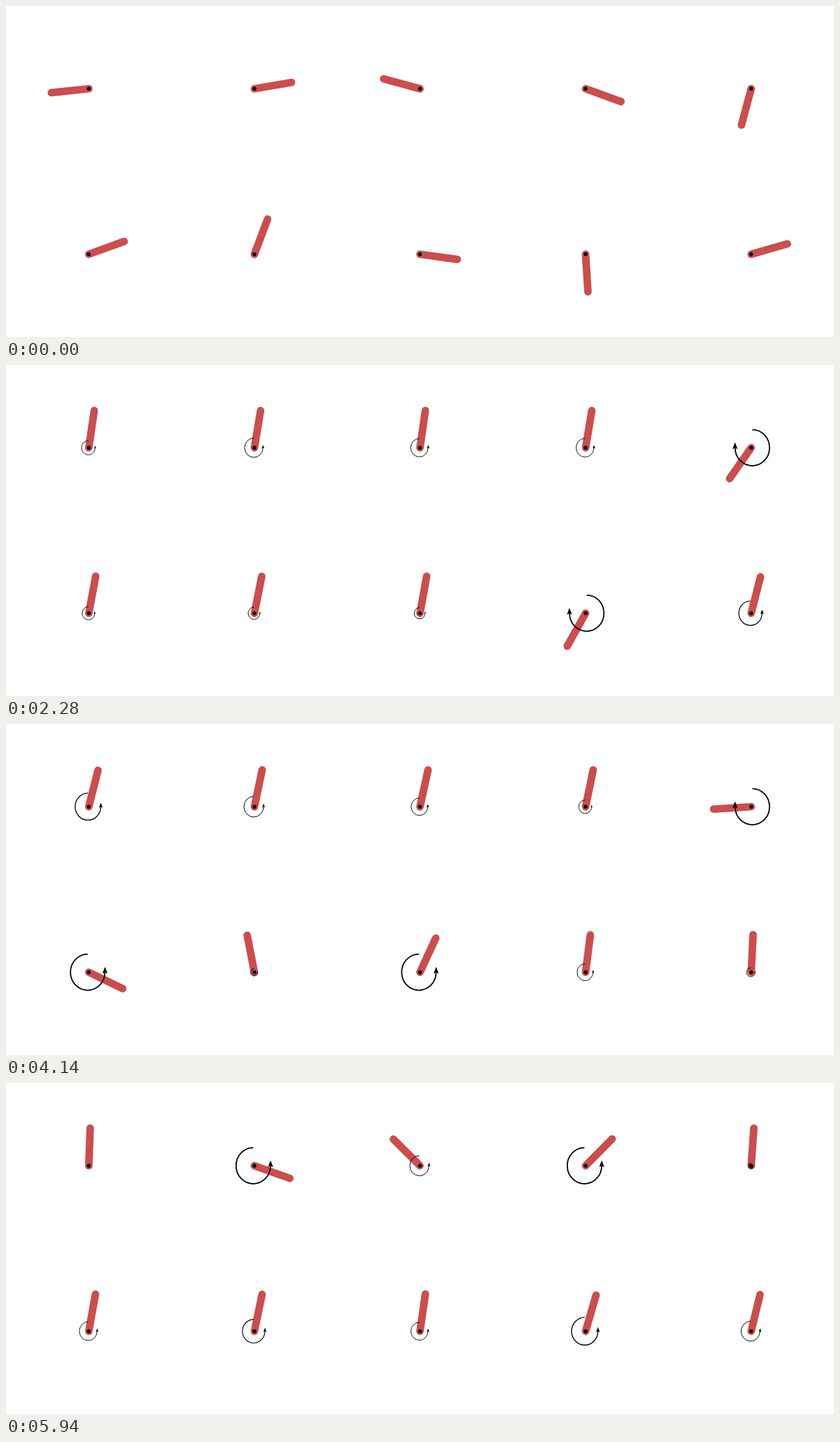
These frames come from a looping animation (1183x473 px, 5.97 s). An HTML page with a canvas:

```html
<!DOCTYPE html>
<html lang="en">
<head>
<meta charset="utf-8">
<title>Ten pendulums</title>
<style>
  html, body { margin: 0; width: 100%; height: 100%; overflow: hidden; background: #fff; }
  canvas { display: block; }
</style>
</head>
<body>
<canvas id="stage" width="1183" height="473"></canvas>
<script>
const ctx = document.getElementById('stage').getContext('2d');
const CELL = 236.6, ROD = CELL / 4.4, STEPS = 199, STEP_MS = 30, REST = 125;
const { sin, cos, abs, floor, max, min, PI } = Math;

// start: first angle, clockwise from upright.
// drops: steps at which the rod sweeps through the bottom on a full turn.
// rock: turning points before that, their reach going evenly from one value to the other.
const pendulums = [
  { start: 264, drops: [34.4, 173.2], rock: { at: [5, 27], reach: [92, 51] } },
  { start: 80.3, drops: [13, 202.7] },
  { start: 285.2, drops: [34.3, 189.5], rock: { at: [4, 27], reach: [108, 47] } },
  { start: 110, drops: [10.5, 211] },
  { start: 195, drops: [169],
    rock: { at: [17, 35, 53, 72, 88, 104, 122, 139, 160], reach: [-24, 97] } },
  { start: 70, drops: [15, 142.2] },
  { start: 20.6, drops: [21, 124.3] },
  { start: 97.8, drops: [11.5, 158] },
  { start: 176.4, drops: [103], rock: { at: [9, 26, 46, 67.5, 91], reach: [-27, 100] } },
  { start: 74, drops: [14, 111.2] }
];

// Shape of a full turn: slow tip over, sweep, slow return to balance.
const turn = [
  [-36, 14], [-22, 22], [-14, 41], [-9, 66], [-4.5, 112], [0, 180],
  [5, 266], [8.5, 315], [14, 350], [18, 359], [27, 363], [36, 367.5]
];

// Smooth curve through points without overshoot.
function curve(pts) {
  const last = pts.length - 1;
  const d = pts.slice(1).map((p, i) => (p[1] - pts[i][1]) / (p[0] - pts[i][0]));
  const m = pts.map((p, i) => {
    const a = d[max(0, i - 1)], b = d[min(last - 1, i)];
    return a * b <= 0 ? 0 : 2 * a * b / (a + b);
  });
  return x => {
    if (x <= pts[0][0]) return pts[0][1];
    if (x >= pts[last][0]) return pts[last][1];
    const i = pts.findIndex(p => p[0] > x) - 1;
    const h = pts[i + 1][0] - pts[i][0], s = (x - pts[i][0]) / h, r = 1 - s;
    return pts[i][1] * r * r * (1 + 2 * s) + pts[i + 1][1] * s * s * (3 - 2 * s) +
      h * s * r * (m[i] * r - m[i + 1] * s);
  };
}

// Swings to and fro about the bottom, ending in a fall through it.
function rocking({ start, drops, rock }) {
  const [from, to] = rock.reach, n = rock.at.length - 1;
  const side = Math.sign(from);
  const pts = [[0, start - 180]];
  rock.at.forEach((t, i) => {
    const size = abs(from) + (abs(to) - abs(from)) * i / n;
    pts.push([t, side * (i % 2 ? -size : size)]);
  });
  // The fall is the first half of one more swing.
  const [t, a] = pts[pts.length - 1];
  pts.push([2 * drops[0] - t, -a]);
  return step => {
    const i = pts.findIndex(p => p[0] > step) - 1;
    const [t0, a0] = pts[i], [t1, a1] = pts[i + 1];
    return 180 + (a0 + a1) / 2 + (a0 - a1) / 2 * cos(PI * (step - t0) / (t1 - t0));
  };
}

function makeMotion(p) {
  const first = p.drops[0];
  const drops = [...p.drops, p.drops[p.drops.length - 1] + REST];
  const turns = curve(drops.flatMap((at, n) => turn.map(([t, a]) => [at + t, a + 360 * n])));
  const early = p.rock ? rocking(p)
    : step => turns(step) + (p.start - turns(0)) * (1 - step / first);
  return step => step < first ? early(step) : turns(step);
}
const motions = pendulums.map(makeMotion);

// Always pushes the rod upwards, and holds it gently near the top.
function torque(c, step, angle) {
  if (step === 0) return 0;
  const a = angle * PI / 180, s = sin(a);
  const hold = (s > 0 ? 5 * s : -2 * s) + .3 * sin(step * 12.9 + c * 7);
  const push = angle % 360 < 150 ? 2 : -2;
  return max(-2, min(2, cos(a) > .6 ? hold : push));
}

function drawArrow(u) {
  const size = abs(u) / 2;
  if (size < .02) return;
  ctx.scale(-u / 2, size);
  ctx.lineWidth = max(1.75, .9 / size);
  ctx.lineCap = 'butt';
  ctx.strokeStyle = ctx.fillStyle = '#000';
  ctx.beginPath();
  ctx.ellipse(1.6, -.1, 24.6, 25.9, 0, -PI / 2, PI);
  ctx.stroke();
  ctx.beginPath();
  ctx.moveTo(-23.1, -7.7);
  ctx.lineTo(-19.4, 2);
  ctx.lineTo(-23.1, 0);
  ctx.lineTo(-26.8, 2);
  ctx.fill();
}

function drawPendulum(c, step) {
  const angle = motions[c](step), a = angle * PI / 180;
  ctx.save();
  ctx.translate((c % 5 + .5) * CELL, (floor(c / 5) + .5) * 236.5);
  ctx.strokeStyle = 'rgb(204,77,77)';
  ctx.lineWidth = ROD * .2;
  ctx.lineCap = 'round';
  ctx.beginPath();
  ctx.moveTo(0, 0);
  ctx.lineTo(ROD * sin(a), -ROD * cos(a));
  ctx.stroke();
  ctx.fillStyle = '#000';
  ctx.beginPath();
  ctx.arc(0, 0, ROD * .05, 0, 2 * PI);
  ctx.fill();
  drawArrow(torque(c, step, angle));
  ctx.restore();
}

const start = performance.now();
function draw() {
  const step = floor(max(0, performance.now() - start) / STEP_MS) % STEPS;
  ctx.fillStyle = '#fff';
  ctx.fillRect(0, 0, 1183, 473);
  pendulums.forEach((_, c) => drawPendulum(c, step));
  requestAnimationFrame(draw);
}
draw();
</script>
</body>
</html>
```
